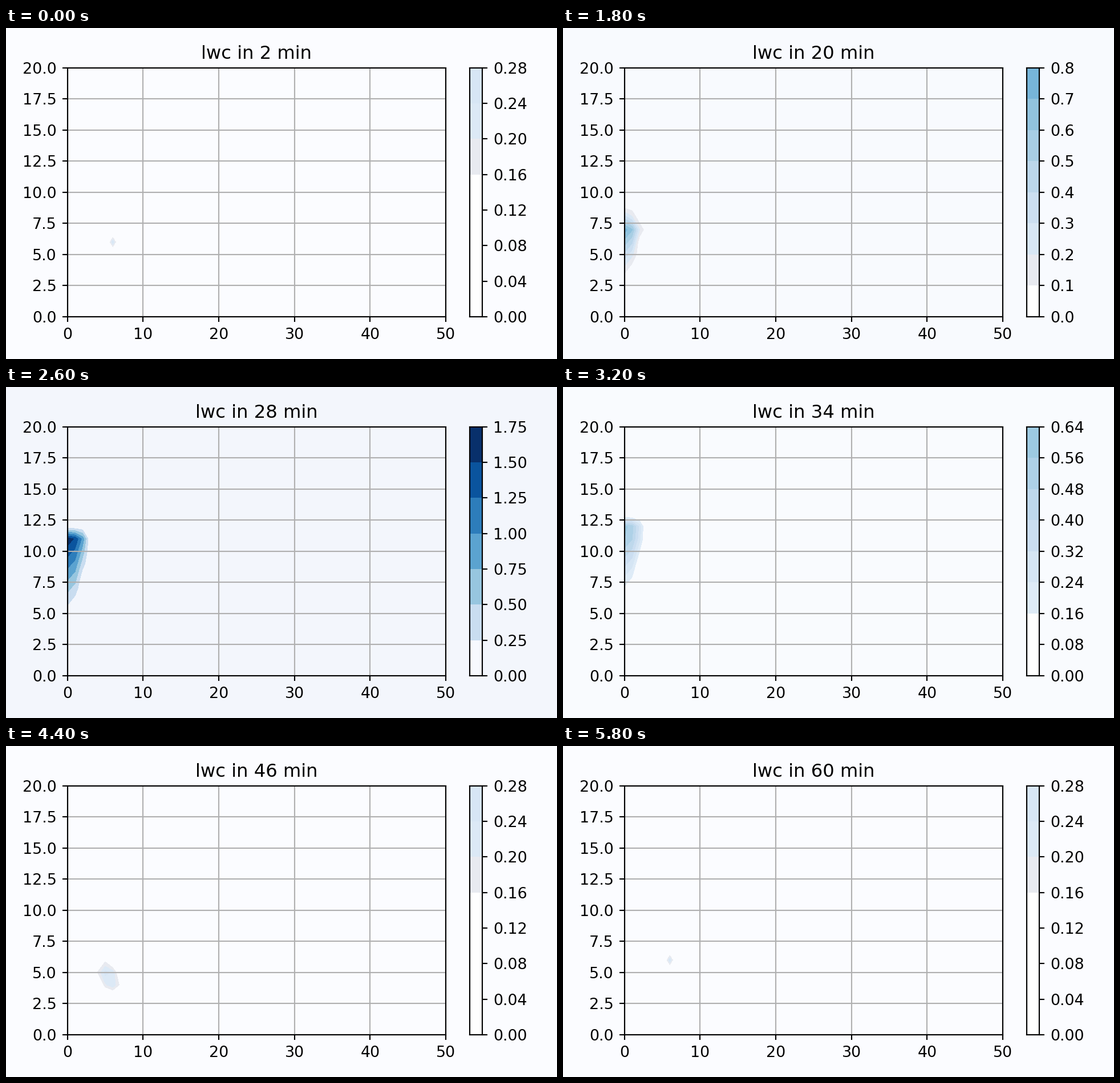
A matplotlib script that plays this animation: 966x580 px, repeating every 6000 ms.

```python
import numpy as np
import matplotlib.pyplot as plt
from matplotlib.animation import FuncAnimation
from matplotlib.ticker import MaxNLocator

W, H, DPI = 966, 580, 193.2
X, Y = np.meshgrid(np.arange(51), np.arange(21))
VMAX = 1.6
FAINT = 0.145


def px_axes(left, top, right, bottom):
    return fig.add_axes([left / W, 1 - bottom / H, (right - left) / W, (bottom - top) / H])


def plume(t):
    """Cloud at the left edge: grows, climbs to 11 km, then fades."""
    def key(*values):
        return np.interp(t, [12, 20, 28, 38], values)

    peak, y0 = key(0.176, 0.75, 1.65, 0), key(4, 7, 11, 12.5)
    radius, up, down = key(1, 2.35, 3, 3), key(1, 2, 1, 1), key(1, 4.2, 6.5, 6.5)
    rise = np.abs(Y - y0) / np.where(Y > y0, up, down)
    column = np.clip(1 - rise, 0, None) ** 1.1
    return peak * np.clip(column - (X / radius) ** 2, 0, None)


def drifter(t):
    """Small tilted cloud that slides right, then shrinks and lifts."""
    def key(*values):
        return np.interp(t, [42, 52, 60], values)

    back = max(0, 52 - t) / 10
    u = X - key(7.95, 7.95, 6) + 7 * back ** 2
    v = Y - key(4.7, 4.7, 6)
    q = (0.23 * u * u + 0.33 * v * v + 0.25 * u * v) / key(1, 1, 0.4) ** 2
    return key(0.185, 0.39, 0.254) * np.clip(1 - q, 0, None)


def lwc(t):
    if t == 2:
        return drifter(60)
    if 12 <= t < 38:
        return plume(t)
    return drifter(t) if t >= 42 else np.zeros(X.shape)


def levels_for(peak):
    if peak == 0:
        return np.array([-2.5e-14, 0, 2.5e-14])
    ticks = MaxNLocator(8).tick_values(0, peak)
    return ticks[:np.searchsorted(ticks, peak, side="right") + 1]


def shade(v, peak):
    if v < FAINT:
        return (0.97, 0.978, 0.996) if peak > 1.4 else (1, 1, 1)
    if v < 0.199:
        return (0.91, 0.918, 0.941)
    return plt.cm.Blues(min(v / VMAX, 1.0))[:3]


def backdrop(peak):
    pale, deep = np.array([252, 253, 255]), np.array([243, 246, 252])
    return tuple((pale + (deep - pale) * min(peak / 1.65, 1)) / 255)


def draw(i):
    t = 2 * (i + 1)
    z = lwc(t)
    peak = z.max()
    levels = levels_for(peak)
    mids = (levels[:-1] + levels[1:]) / 2
    colors = [shade(v, peak) for v in mids]
    back = backdrop(peak)
    fig.set_facecolor(back)

    ax.clear()
    ax.set_facecolor(back)
    if peak:
        fills = [back if v < FAINT else c for v, c in zip(mids, colors)]
        ax.contourf(X, Y, z, levels=levels, colors=fills)
    ax.set(xlim=(0, 50), ylim=(0, 20), title=f"lwc in {t} min")
    ax.set_yticks(np.arange(0, 20.1, 2.5))
    ax.grid(True)

    bar.clear()
    for lo, hi, c in zip(levels[:-1], levels[1:], colors):
        bar.axhspan(lo, hi, color=c, lw=0)
    bar.set_xticks([])
    bar.set_yticks(levels)
    bar.set_ylim(levels[0], levels[-1])
    bar.yaxis.tick_right()
    bar.yaxis.set_offset_position("right")
    return []


plt.rcParams.update({"font.family": "DejaVu Sans", "font.size": 10})
fig = plt.figure(figsize=(W / DPI, H / DPI), dpi=DPI)
ax = px_axes(107.7, 69.9, 770.9, 505.9)
bar = px_axes(813, 69.9, 835, 505.9)

anim = FuncAnimation(fig, draw, frames=30, interval=200, init_func=lambda: [],
                     repeat=True, repeat_delay=0, blit=False)
plt.show()
```
